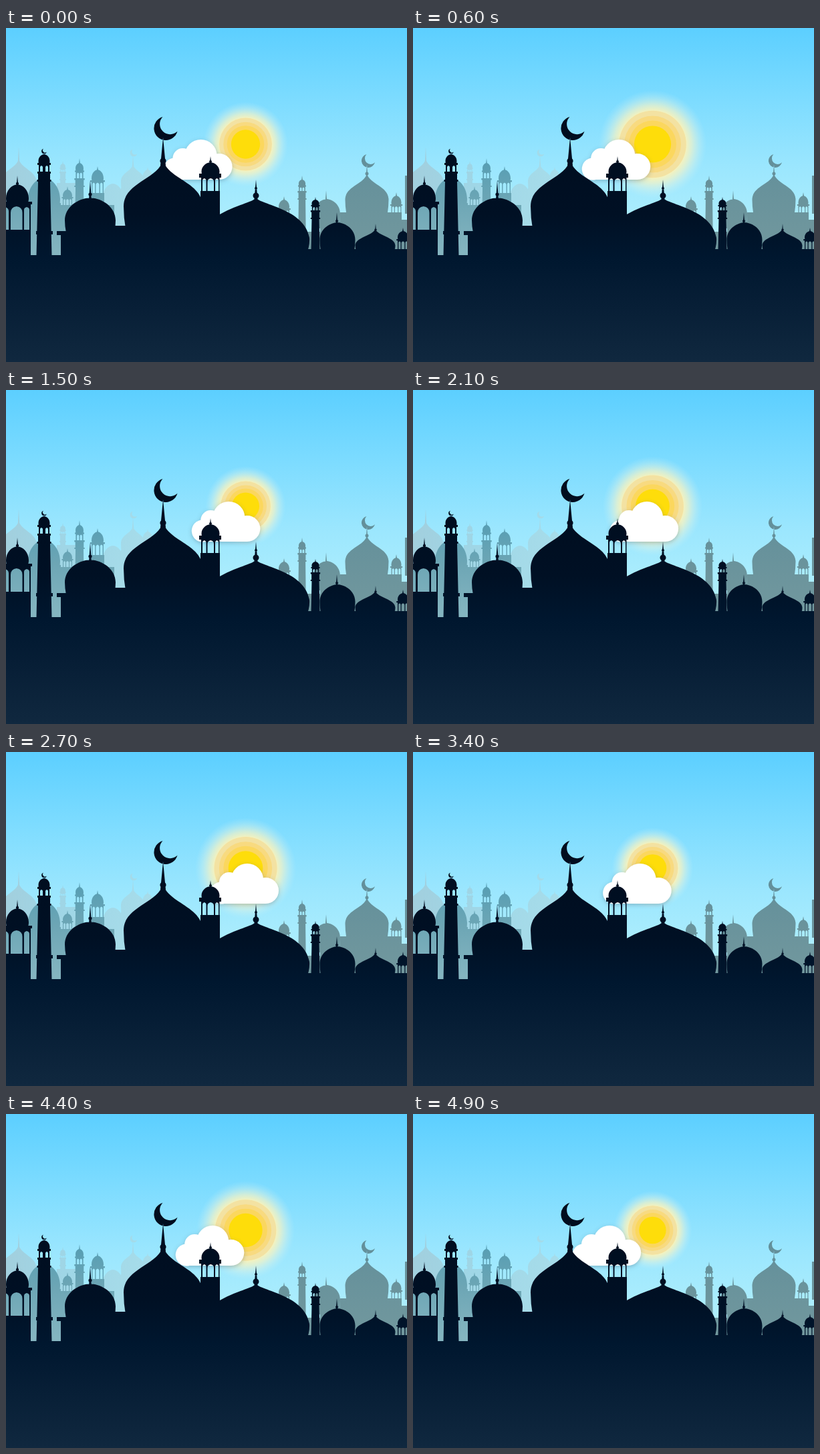
An HTML page that plays this animation: 600 px wide and 500 px high, repeating every 5 s.

```html
<!DOCTYPE html>
<html lang="en">
<head>
<meta charset="utf-8">
<title>Skyline</title>
<style>
html, body { margin: 0; width: 100%; height: 100%; overflow: hidden; background: #5ccfff; }
svg { display: block; width: 100vw; height: 100vh; }
</style>
</head>
<body>
<svg viewBox="0 0 600 500" preserveAspectRatio="none">
  <defs>
    <linearGradient id="sky" gradientUnits="userSpaceOnUse" x1="0" y1="0" x2="0" y2="340">
      <stop offset="0" stop-color="#5ccfff"/>
      <stop offset=".3" stop-color="#7bdbff"/>
      <stop offset=".6" stop-color="#9ae6fe"/>
      <stop offset="1" stop-color="#b8f2fc"/>
    </linearGradient>
    <linearGradient id="farFill" gradientUnits="userSpaceOnUse" x1="0" y1="0" x2="230" y2="0">
      <stop offset="0" stop-color="#a3cbd8"/>
      <stop offset=".4" stop-color="#9fd3e2"/>
      <stop offset="1" stop-color="#a9dbe7"/>
    </linearGradient>
    <linearGradient id="midFill" gradientUnits="userSpaceOnUse" x1="0" y1="195" x2="0" y2="340">
      <stop offset="0" stop-color="#559db3"/>
      <stop offset=".45" stop-color="#6da6b5"/>
      <stop offset="1" stop-color="#86b6c1"/>
    </linearGradient>
    <linearGradient id="eastFill" gradientUnits="userSpaceOnUse" x1="0" y1="190" x2="0" y2="335">
      <stop offset="0" stop-color="#628f9a"/>
      <stop offset="1" stop-color="#72989e"/>
    </linearGradient>
    <linearGradient id="nearFill" gradientUnits="userSpaceOnUse" x1="0" y1="130" x2="0" y2="500">
      <stop offset="0" stop-color="#000c1d"/>
      <stop offset=".4" stop-color="#001024"/>
      <stop offset=".58" stop-color="#00172f"/>
      <stop offset="1" stop-color="#10283f"/>
    </linearGradient>
    <radialGradient id="halo">
      <stop offset=".6" stop-color="#fff3b4" stop-opacity=".95"/>
      <stop offset=".72" stop-color="#f6f4c6" stop-opacity=".7"/>
      <stop offset=".86" stop-color="#e4f4e2" stop-opacity=".33"/>
      <stop offset="1" stop-color="#c8eff6" stop-opacity="0"/>
    </radialGradient>
    <filter id="shade" x="-20%" y="-20%" width="140%" height="150%">
      <feDropShadow dx="0" dy="2" stdDeviation="3" flood-color="#40616e" flood-opacity=".35"/>
    </filter>
  </defs>

  <rect width="600" height="500" fill="url(#sky)"/>
  <g id="sun">
    <circle r="82" fill="url(#halo)"/>
    <circle r="51" fill="#f3e2a2"/>
    <circle r="43" fill="#f8da80"/>
    <circle r="36" fill="#fbd75e"/>
    <circle r="28" fill="#fedd0a"/>
  </g>
  <!-- the cloud's right edge lies at x = 0 -->
  <g id="cloud" fill="#fff" filter="url(#shade)">
    <circle cx="-47" cy="191" r="24"/>
    <circle cx="-74" cy="195" r="15"/>
    <circle cx="-86" cy="211" r="16.5"/>
    <circle cx="-19.5" cy="207.5" r="19.5"/>
    <rect x="-86" y="195" width="66" height="32"/>
  </g>
  <path id="far" fill="url(#farFill)" opacity=".85"/>
  <path id="mid" fill="url(#midFill)"/>
  <path id="east" fill="url(#eastFill)"/>
  <path id="near" fill="url(#nearFill)"/>
</svg>
<script>
const $ = id => document.getElementById(id);

// All outlines run clockwise; arch openings run the other way and cut holes.
const box = (x1, y1, x2, y2) => `M${x1} ${y1}H${x2}V${y2}H${x1}Z`;
const ball = (x, y, r) => `M${x - r} ${y}a${r} ${r} 0 0 1 ${2 * r} 0a${r} ${r} 0 0 1 ${-2 * r} 0Z`;
const spike = (x, top, base, w) => `M${x} ${top}L${x + w} ${base}H${x - w}Z`;
const arch = (x1, x2, top, base) => {
  const m = (x1 + x2) / 2, s = top + (x2 - x1) * .55;
  return `M${x1} ${base}H${x2}V${s}Q${x2} ${top + 1} ${m} ${top}Q${x1} ${top + 1} ${x1} ${s}Z`;
};

// Dome shape: a and b place the curve handles between tip and widest point.
const curve = (x, r, top, mid, base, k, a, b) => {
  const c = r * k, y1 = top + (mid - top) * a, y2 = top + (mid - top) * b, yb = (mid + base) / 2;
  return `M${x} ${top}C${x + c} ${y1} ${x + r} ${y2} ${x + r} ${mid}Q${x + r} ${yb} ${x + r * .95} ${base}` +
    `H${x - r * .95}Q${x - r} ${yb} ${x - r} ${mid}C${x - r} ${y2} ${x - c} ${y1} ${x} ${top}Z`;
};
const dome = (x, r, top, mid, base) => curve(x, r, top, mid, base, .5, .04, .42);
const onion = (x, r, top, mid, base) => curve(x, r, top, mid, base, .14, .42, .48);

const moon = (x, y, s) =>
  `M${x - 4.5 * s} ${y - 17.5 * s}A${17.8 * s} ${17.8 * s} 0 1 0 ${x + 17.5 * s} ${y + 4 * s}` +
  `A${15.3 * s} ${15.3 * s} 0 1 1 ${x - 4.5 * s} ${y - 17.5 * s}Z`;

// Domed kiosk: three arches between a cornice and a floor.
const kiosk = (x, r, tip, top, eave, floor) => {
  const a = eave + r * .28, p = r * .16, w = r * .36;
  return spike(x, tip, top + 3, 1.5) + dome(x, r, top, eave - r * .3, eave) +
    box(x - r * 1.22, eave, x + r * 1.22, a) + box(x - r, a, x + r, floor) +
    arch(x - r + p, x - w - p / 2, a + 1, floor) + arch(x - w + p / 2, x + w - p / 2, a + 1, floor) +
    arch(x + w + p / 2, x + r - p, a + 1, floor);
};

// Slim tower with a lantern, two balconies and a shaft.
const minaret = (x, r, tip, top, deck, foot) => {
  const h = deck - top, eave = top + h * .5;
  return spike(x, tip, top + 3, 1.2) + dome(x, r * .85, top, top + h * .35, eave) +
    box(x - r, eave, x + r, eave + 2) + box(x - r * .8, eave + 2, x + r * .8, deck) +
    arch(x - r * .55, x - r * .1, eave + 3, deck) + arch(x + r * .1, x + r * .55, eave + 3, deck) +
    box(x - r * 1.1, deck, x + r * 1.1, deck + 2.5) + box(x - r * .9, deck + 2.5, x + r * .9, deck + 12) +
    box(x - r * 1.1, deck + 11, x + r * 1.1, deck + 13) +
    `M${x - r * .85} ${deck + 13}H${x + r * .85}L${x + r} ${foot}H${x - r}Z`;
};

const layers = {
  far: [
    spike(19, 178, 206, 1.5), onion(19, 27, 196, 232, 260), box(0, 240, 46, 340),
    minaret(85, 4.5, 199, 203, 215, 300), box(76, 232, 104, 340),
    moon(191, 187, .3), spike(190, 191, 210, 1.5), onion(190, 18, 204, 230, 245),
    minaret(179, 5, 228, 233, 245, 300), box(160, 265, 180, 340), box(172, 240, 230, 340),
    kiosk(212, 7, 208, 212, 224, 240), dome(160, 15, 233, 253, 270)
  ],
  mid: [
    dome(57, 24, 224, 257, 266), box(32, 262, 82, 340), box(68, 265, 162, 340),
    minaret(110, 7, 195, 202, 225, 300), kiosk(92, 7, 237, 242, 253, 265),
    kiosk(137, 9, 207, 212, 228, 248), box(128, 247, 147, 340), box(0, 262, 46, 303)
  ],
  east: [
    minaret(443, 6, 221, 227, 244, 335), kiosk(416, 8, 252, 257, 270, 281), box(408, 279, 425, 335),
    spike(479, 243, 260, 1.3), dome(480, 20, 256, 278, 300), box(448, 305, 480, 335),
    moon(542, 199, .57), spike(540, 204, 224, 1.5), ball(540, 218, 2.5), onion(540, 32.5, 218, 257, 277),
    box(500, 276, 592, 335), box(470, 290, 510, 335), kiosk(584, 7.5, 246, 251, 264, 277),
    box(597, 221, 600, 278), box(592, 287, 600, 335)
  ],
  near: [
    box(0, 340, 600, 500), box(300, 331, 600, 341),
    // west kiosk
    spike(17, 221, 238, 1.6), ball(17, 233, 2.2), dome(17, 17, 234, 255, 261), box(-2, 260, 39, 264),
    box(-9, 264, 37, 303), arch(-8, 4, 268, 303), arch(7, 24.5, 267, 303), arch(27, 35, 268, 303),
    box(0, 302, 37, 341),
    // tall minaret
    moon(57, 184.5, .22), spike(57, 186, 194, 1.2), dome(57, 8.5, 189, 199, 203), box(47, 202, 67, 205),
    box(49, 205, 65, 216), arch(51, 55, 206, 215), arch(59, 63, 206, 215), box(47, 215, 67, 218),
    box(48, 218, 66, 228), box(46.5, 227, 67.5, 230), "M48 230H66L68.5 341H45.5Z", box(45, 304, 70, 309),
    // round dome
    spike(126, 228, 257, 2), ball(126, 249, 2.6), dome(126, 38, 254, 288, 306),
    box(76, 304, 100, 310), box(82, 304, 180, 341), box(162, 296, 300, 341),
    // great dome
    moon(239, 150.5, 1), spike(235, 164, 206, 4), ball(235, 199, 4.6), onion(235, 59, 198, 267, 300),
    // bell tower
    spike(306, 192, 206, 1.8), ball(306, 200, 2), dome(306, 13.5, 201, 215, 219), box(289, 218, 322, 224),
    box(292, 223, 319.5, 246), arch(294, 299.5, 225, 245), arch(301.5, 311, 225, 245), arch(313, 318, 225, 245),
    box(291, 244, 320, 341),
    // wide dome
    spike(374, 227, 262, 3), ball(374, 251, 4.5), ball(374, 240, 2),
    "M374 254C381 265 446 270 454 314Q455 325 449 341H299Q293 325 294 314C302 270 367 265 374 254Z",
    // east row
    minaret(463, 6.5, 253, 257, 273, 333),
    spike(495, 276, 294, 1.5), ball(495, 289, 2), dome(496, 26.5, 291, 317, 333),
    spike(553, 293, 308, 1.4), ball(553, 302, 1.8), onion(552.5, 30, 301, 326, 333),
    kiosk(594, 8, 299, 304, 316, 332)
  ]
};
for (const id in layers) $(id).setAttribute("d", layers[id].join(""));

const loop = 5000, step = 100;
const pulse = [[-.3, .72], [.75, 1], [1.62, .72], [2.4, 1], [3.25, .72], [4.05, 1], [4.9, .72], [5.1, .75]];
const drift = [[0, 338.5], [2.6, 411], [5, 338]];
const linear = u => u;
const sine = u => (1 - Math.cos(Math.PI * u)) / 2;

function at(knots, t, ease) {
  const i = knots.findIndex(k => k[0] > t);
  const [t0, v0] = knots[i - 1], [t1, v1] = knots[i];
  return v0 + (v1 - v0) * ease((t - t0) / (t1 - t0));
}

const start = performance.now();
function draw() {
  const t = Math.floor((performance.now() - start) % loop / step) * step / 1000;
  $("sun").setAttribute("transform", `translate(358.5 174) scale(${at(pulse, t, sine)})`);
  $("cloud").setAttribute("transform", `translate(${at(drift, t, linear)} 0)`);
  requestAnimationFrame(draw);
}
draw();
</script>
</body>
</html>
```
